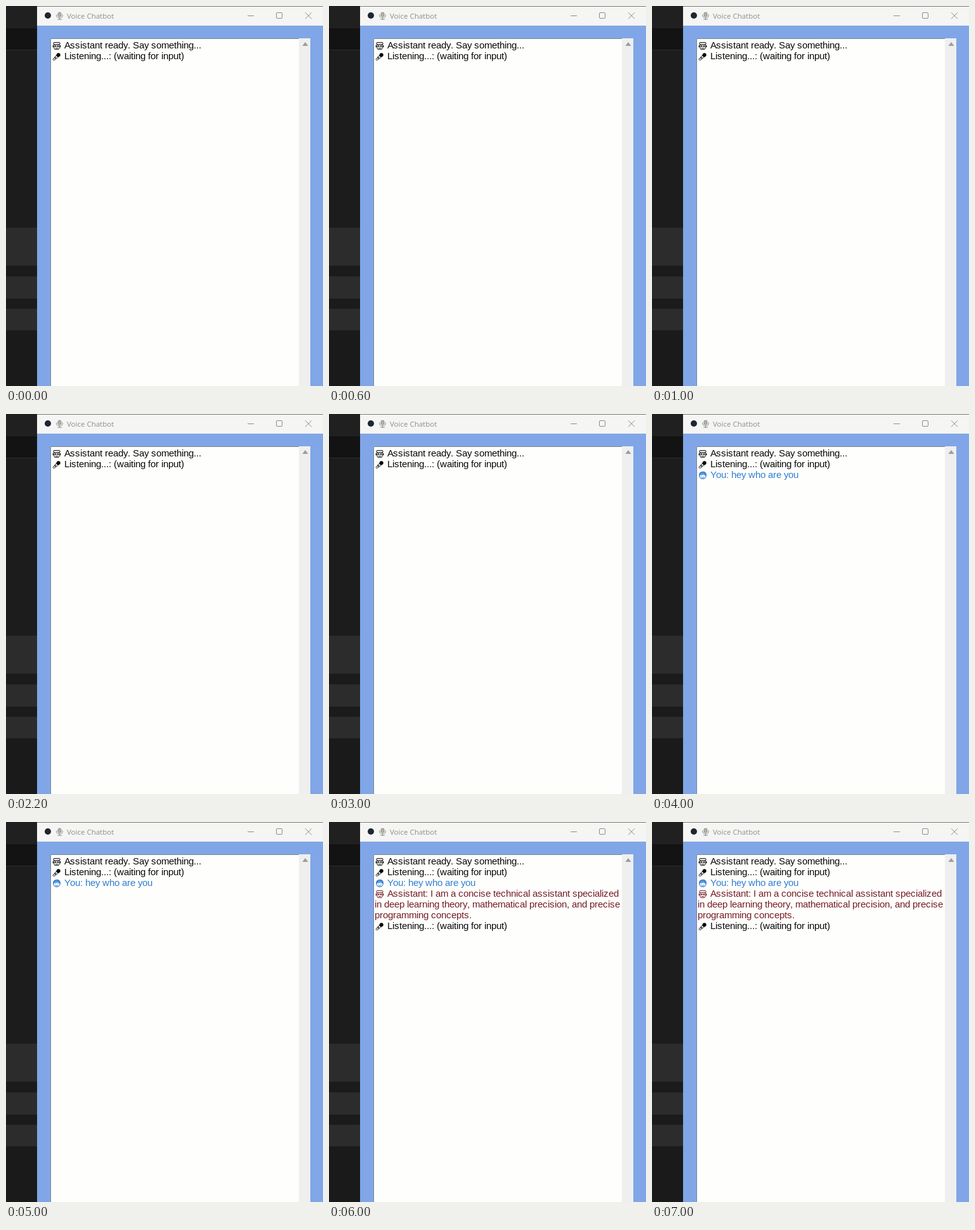
Animation, 500 px wide and 600 px high, one loop 8000 ms. Source, as an HTML page:

```html
<!DOCTYPE html>
<html lang="en">
<head>
<meta charset="utf-8">
<title>Voice Chatbot</title>
<style>
  html, body { margin: 0; width: 100%; height: 100%; overflow: hidden; background: #80a6e7; }
  svg { display: block; }
  .chat { font: 15px "Liberation Sans", Arial, sans-serif; color: #080808; }
  .title { font: 11.5px "Open Sans", "Noto Sans", sans-serif; }
  .chat .user { color: #2f7ed0; }
  .chat .bot { color: #741c24; }
  .chat text { fill: currentColor; }
</style>
</head>
<body>
<svg width="500" height="600" viewBox="0 0 500 600">
  <defs>
    <!-- 14 x 14 icons -->
    <g id="robot" fill="none" stroke="currentColor">
      <path d="M3 4.5V10.5Q3 12.5 5 12.5H9Q11 12.5 11 10.5V4.5ZM2 4.5V2.5Q2 1.5 3 1.5H11Q12 1.5 12 2.5V4.5Z"/>
      <path d="M1.4 6V9.2M12.6 6V9.2" stroke-width="1.4"/>
      <path d="M5 10.5H9"/>
      <g fill="currentColor" stroke="none">
        <circle cx="5.3" cy="7.2" r="1.2"/><circle cx="8.7" cy="7.2" r="1.2"/>
      </g>
    </g>
    <g id="mic" fill="none" stroke="currentColor">
      <path d="M5.6 5.6L1 11.4L2.4 12.8L8.4 8.4"/>
      <path d="M4 9.8L6 7.8" stroke-width="1.3"/>
      <path d="M6 4.4L9.6 8" stroke-width="1.2"/>
      <circle cx="9.7" cy="4.3" r="3" fill="currentColor" stroke="none"/>
    </g>
    <g id="person" fill="none" stroke="currentColor" stroke-width="1.1">
      <circle cx="7" cy="7.2" r="5.3"/>
      <path d="M1.8 7C1.4 3.6 3.6 1.4 6.4 1.6C9.8.8 12.8 3 12.3 7C11 6.6 10 5.6 9.4 4.6C7.6 5.6 5 5.4 4 5.2Z" fill="currentColor" fill-opacity=".7"/>
      <path d="M5 7.2V8.4M9 7.2V8.4M5 10.2Q7 11.4 9 10.2"/>
    </g>
  </defs>

  <g id="desk"></g>

  <!-- window -->
  <rect x="49" width="451" height="600" fill="#80a6e7"/>
  <rect x="49" width="451" height="31" fill="#f5f5f3"/>
  <path d="M49 .5H500" stroke="#777"/>

  <!-- title bar -->
  <circle cx="66" cy="15" r="5" fill="#1d2633"/>
  <g fill="none" stroke="#8c8c8c">
    <rect x="82" y="10" width="5" height="7" rx="2.5" fill="#8c8c8c" fill-opacity=".65"/>
    <path d="M79.8 13.5V15.5C80 18 82 18.8 84.5 18.8S89 18 89.2 15.5V13.5M84.5 19V21M81.2 21.2H87.8"/>
    <path d="M381 15.5H391"/>
    <rect x="426.5" y="10.5" width="9" height="9" rx="1.5"/>
    <path d="M472 10.3L482 20.3M482 10.3L472 20.3"/>
  </g>
  <text class="title" x="96" y="20" fill="#8e8e8e">Voice Chatbot</text>

  <!-- text area and scrollbar -->
  <rect x="70" y="51" width="392" height="549" fill="#fefefc"/>
  <path d="M70.5 600V51.5H462" fill="none" stroke="#788494"/>
  <rect x="462" y="51" width="18" height="549" fill="#efefef"/>
  <path d="M472 57L476.6 63H467.4Z" fill="#9d9d9d"/>

  <g id="chat" class="chat"></g>
  <path id="caret" d="M197 84.5H199.5L200.5 85.5L201.5 84.5H204M200.5 85V98M197 98.5H199.5L200.5 97.5L201.5 98.5H204" fill="none" stroke="#111"/>
</svg>
<script>
const LOOP = 8000;
const NS = "http://www.w3.org/2000/svg";

function add(parent, tag, attrs, text) {
  const el = document.createElementNS(NS, tag);
  for (const key in attrs) el.setAttribute(key, attrs[key]);
  if (text) el.textContent = text;
  parent.append(el);
  return el;
}

// Visible only between two times of the loop, with hard cuts
function show(el, from, to) {
  const a = from / LOOP, b = to / LOOP;
  const steps = [[0, 0], [a, 0], [a, 1], [b, 1], [b, 0], [1, 0]];
  el.animate(steps.map(([offset, opacity]) => ({ offset, opacity })),
    { duration: LOOP, iterations: Infinity });
}

// Hinted type: whole-pixel advances, diagonal letters a pixel tighter
const pen = document.createElement("canvas").getContext("2d");
pen.font = '15px "Liberation Sans", Arial, sans-serif';
function hinted(text, x) {
  return [...text].map(ch => {
    const at = x;
    x += Math.round(pen.measureText(ch).width) - /[AYy]/.test(ch);
    return at;
  }).join(" ");
}

// Dark strip beside the window: top edge, colour
const bands = [
  [0, "#202020"], [35, "#131313"], [69, "#2c2c2c"], [70, "#1c1c1c"],
  [350, "#2c2c2c"], [410, "#1b1b1b"], [427, "#2c2c2c"], [462, "#1b1b1b"],
  [478, "#2c2c2c"], [512, "#1a1a1a"]
];
const desk = document.getElementById("desk");
for (const [y, fill] of bands) add(desk, "rect", { y, width: 49, height: 600 - y, fill });

// Start time, style, icon, text
const lines = [
  [0, "", "robot", "Assistant ready. Say something..."],
  [0, "", "mic", "Listening...: (waiting for input)"],
  [4000, "user", "person", "You: hey who are you"],
  [6000, "bot", "robot", "Assistant: I am a concise technical assistant specialized"],
  [6000, "bot", "", "in deep learning theory, mathematical precision, and precise"],
  [6000, "bot", "", "programming concepts."],
  [6000, "", "mic", "Listening...: (waiting for input)"]
];
const chat = document.getElementById("chat");
lines.forEach(([start, style, icon, text], i) => {
  const y = 67 + i * 17;
  const row = add(chat, "g", { class: style });
  if (icon) add(row, "use", { href: "#" + icon, x: 73, y: y - 11 });
  add(row, "text", { x: hinted(text, icon ? 92 : 72), y }, text);
  if (start) show(row, start, LOOP);
});

show(document.getElementById("caret"), 0, 1000);
</script>
</body>
</html>
```
